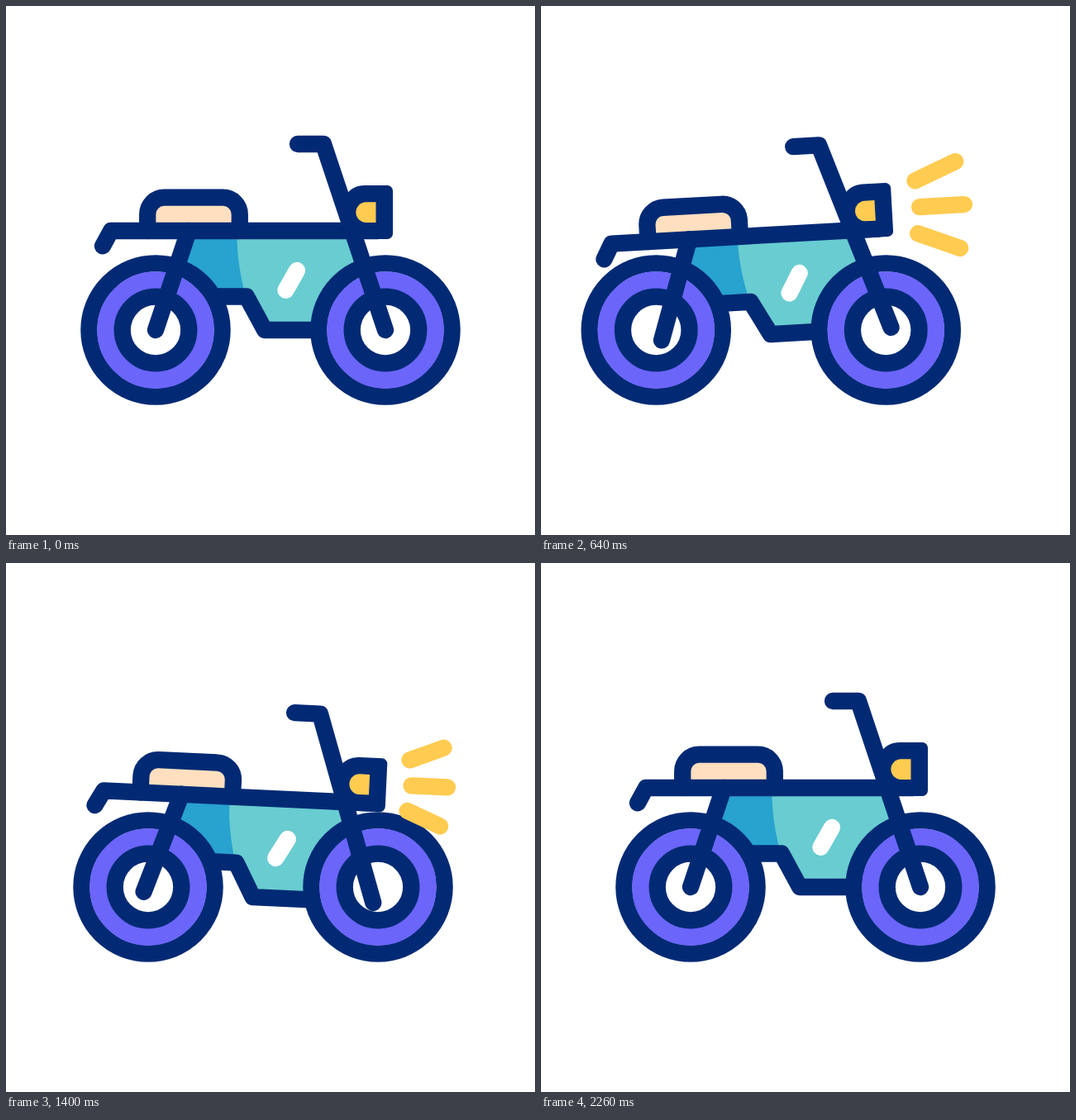
Animation of 640 by 640 pixels, one loop 2400 ms. Source, as an HTML page:

```html
<!DOCTYPE html>
<html lang="en">
<head>
<meta charset="utf-8">
<title>Bouncing motorbike</title>
<style>
  html, body { margin: 0; height: 100%; overflow: hidden; background: #fff; }
  svg { display: block; width: 100vw; height: 100vh; }
  .line, .ray { fill: none; stroke: #022a74; stroke-width: 20.3; stroke-linecap: round; stroke-linejoin: round; }
  .ray { stroke: #ffcb50; }
</style>
</head>
<body>
<svg viewBox="0 0 640 640">
  <defs>
    <g id="wheel">
      <circle r="80.6" fill="#fff" stroke="#022a74" stroke-width="20.3"/>
      <circle r="60.4" fill="none" stroke="#6b65fa" stroke-width="20.8"/>
      <circle r="40.3" fill="none" stroke="#022a74" stroke-width="20.3"/>
    </g>
  </defs>
  <g class="body">
    <path fill="#68ccd1" d="M221 272L206 315A81 81 0 0 1 251 351H291L313 392H378A81 81 0 0 1 434 315L419 272Z"/>
    <path fill="#28a2ce" d="M221 272L206 315A81 81 0 0 1 251 351H290C283 325 279 300 279.5 272Z"/>
    <path class="line" style="stroke:#fff" d="M352 320L338.5 343.7"/>
    <path class="line" d="M251 351.5H291L313 392H378"/>
  </g>
  <g id="wheels">
    <use href="#wheel" x="181" y="392"/>
    <use href="#wheel" x="459" y="392"/>
  </g>
  <g class="body" id="top">
    <path class="line" style="fill:#ffdfbf" d="M171.2 272V252A20.3 20.3 0 0 1 191.5 231.7H262.5A20.3 20.3 0 0 1 282.8 252V272"/>
    <path class="line" d="M117 290.3L127 272H450"/>
    <path class="line" d="M181 392L221 272M459 392L384 167H353"/>
    <path fill="#022a74" d="M410 230Q419 217 434 217H461.5A6.5 6.5 0 0 1 468 223.5V275.5A6.5 6.5 0 0 1 461.5 282H405Z"/>
    <path fill="#ffcb50" d="M447.5 237.3H435.6A12.3 12.3 0 0 0 435.6 261.9H447.5Z"/>
  </g>
</svg>
<script>
const LOOP = 2400;
const RAY = 57;

// key poses as [time, value], eased in and out between neighbours
const shift = [[20, 0], [570, -45.4], [1110, 32], [1630, -37.6], [2160, 0]];
const lift = [[0, 0], [500, 10.3], [970, -15], [1402, 12.5], [1815, -9.4], [2255, 0]];
const tilt = [[0, 0], [665, -3.2], [1530, 3.1], [2112, 0]];

// the lamp flashes twice, a fixed interval apart
const flash = { first: 245, gap: 910, grow: 360, trim: 340, end: 735 };

const bodies = document.querySelectorAll('.body');
const wheels = document.getElementById('wheels');

// three rays fanned around the lamp's axis
const rays = [-1, 0, 1].map(k => {
  const ray = document.createElementNS('http://www.w3.org/2000/svg', 'path');
  ray.setAttribute('class', 'ray');
  ray.setAttribute('transform',
    `translate(${498.5 - 3.5 * Math.abs(k)} ${248.3 + 30.8 * k}) rotate(${22.4 * k})`);
  return document.getElementById('top').appendChild(ray);
});

function ease(t, a, b) {
  const p = Math.min(1, Math.max(0, (t - a) / (b - a)));
  return p * p * (3 - 2 * p);
}

function track(keys, t) {
  return keys.slice(1).reduce((v, [time, value], i) =>
    v + (value - keys[i][1]) * ease(t, keys[i][0], time), keys[0][1]);
}

// the head grows outwards, then the tail catches up
function drawRays(t) {
  const age = t - flash.first - (t < flash.first + flash.gap ? 0 : flash.gap);
  const shown = age > 0 && age < flash.end;
  const head = RAY * ease(age, 0, flash.grow);
  const tail = RAY * ease(age, flash.trim, flash.end);
  for (const ray of rays) ray.setAttribute('d', shown ? `M${tail} 0H${head}` : '');
}

function draw(t) {
  const x = track(shift, t);
  const pose = `translate(${x} ${track(lift, t)}) rotate(${track(tilt, t)} 320 275)`;
  wheels.setAttribute('transform', `translate(${x} 0)`);
  for (const body of bodies) body.setAttribute('transform', pose);
  drawRays(t);
}

const start = performance.now();
function tick() {
  draw((performance.now() - start) % LOOP);
  requestAnimationFrame(tick);
}
tick();
</script>
</body>
</html>
```
